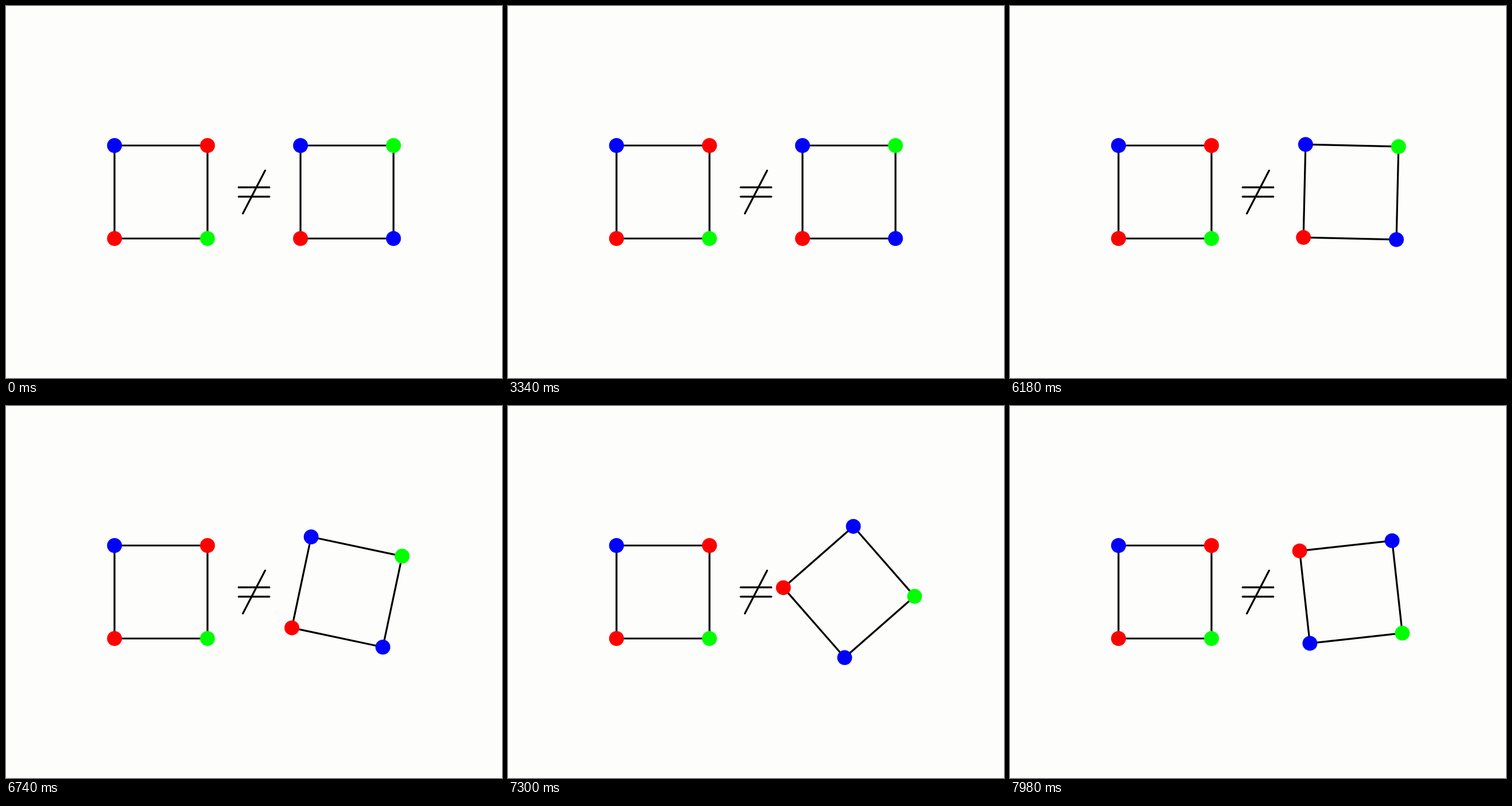
Write an HTML page with a canvas that moves like this. It is 864 px wide and 648 px high and loops after 8000 ms.

```html
<!DOCTYPE html>
<html lang="en">
<head>
<meta charset="utf-8">
<title>Two labelled squares</title>
<style>
html, body { margin: 0; width: 100%; height: 100%; overflow: hidden; background: #fdfdfc; }
canvas { display: block; }
</style>
</head>
<body>
<canvas id="stage" width="864" height="648"></canvas>
<script>
const ctx = document.getElementById('stage').getContext('2d');
const LOOP = 8000;
const UNIT = 81;
const RED = '#ff0000', GREEN = '#00ff00', BLUE = '#0000ff';
const TURN_START = 126, TURN_STEPS = 60;

// Three ticks per 140 ms, held for 20, 100 and 20 ms.
function tickAt(ms) {
  const rest = ms % 140;
  return 3 * Math.floor(ms / 140) + (rest >= 120 ? 2 : rest >= 20 ? 1 : 0);
}

const sigmoid = x => 1 / (1 + Math.exp(-x));

function smooth(t) {
  const edge = sigmoid(-5);
  const u = Math.min(1, Math.max(0, t));
  return (sigmoid(10 * (u - 0.5)) - edge) / (1 - 2 * edge);
}

function line(x1, y1, x2, y2) {
  ctx.beginPath();
  ctx.moveTo(x1, y1);
  ctx.lineTo(x2, y2);
  ctx.stroke();
}

// Colours run clockwise from the top left corner.
function square(cx, cy, colors, angle) {
  const radius = UNIT * Math.SQRT2;
  const corners = colors.map((color, i) => {
    const a = angle + (i * 2 - 3) * Math.PI / 4;
    return { color, x: cx + radius * Math.cos(a), y: cy + radius * Math.sin(a) };
  });
  corners.forEach((p, i) => {
    const q = corners[(i + 1) % 4];
    line(p.x, p.y, q.x, q.y);
  });
  for (const p of corners) {
    ctx.fillStyle = p.color;
    ctx.beginPath();
    ctx.arc(p.x, p.y, 0.16 * UNIT, 0, Math.PI * 2);
    ctx.fill();
  }
}

function notEqual(cx, cy) {
  for (const dy of [-8.1, 8.1]) line(cx - 26.8, cy + dy, cx + 26.8, cy + dy);
  line(cx - 19.4, cy + 37.4, cx + 19.4, cy - 37.4);
}

function draw(ms) {
  const turn = smooth((tickAt(ms) - TURN_START) / TURN_STEPS) * Math.PI / 2;
  ctx.fillStyle = '#fdfdfc';
  ctx.fillRect(0, 0, 864, 648);
  ctx.strokeStyle = '#000';
  ctx.lineWidth = 0.04 * UNIT;
  ctx.lineCap = 'round';
  square(270, 324, [BLUE, RED, GREEN, RED], 0);
  notEqual(432, 324);
  square(594, 324, [BLUE, GREEN, BLUE, RED], turn);
}

const start = performance.now();
function loop() {
  draw((performance.now() - start) % LOOP);
  requestAnimationFrame(loop);
}
loop();
</script>
</body>
</html>
```
